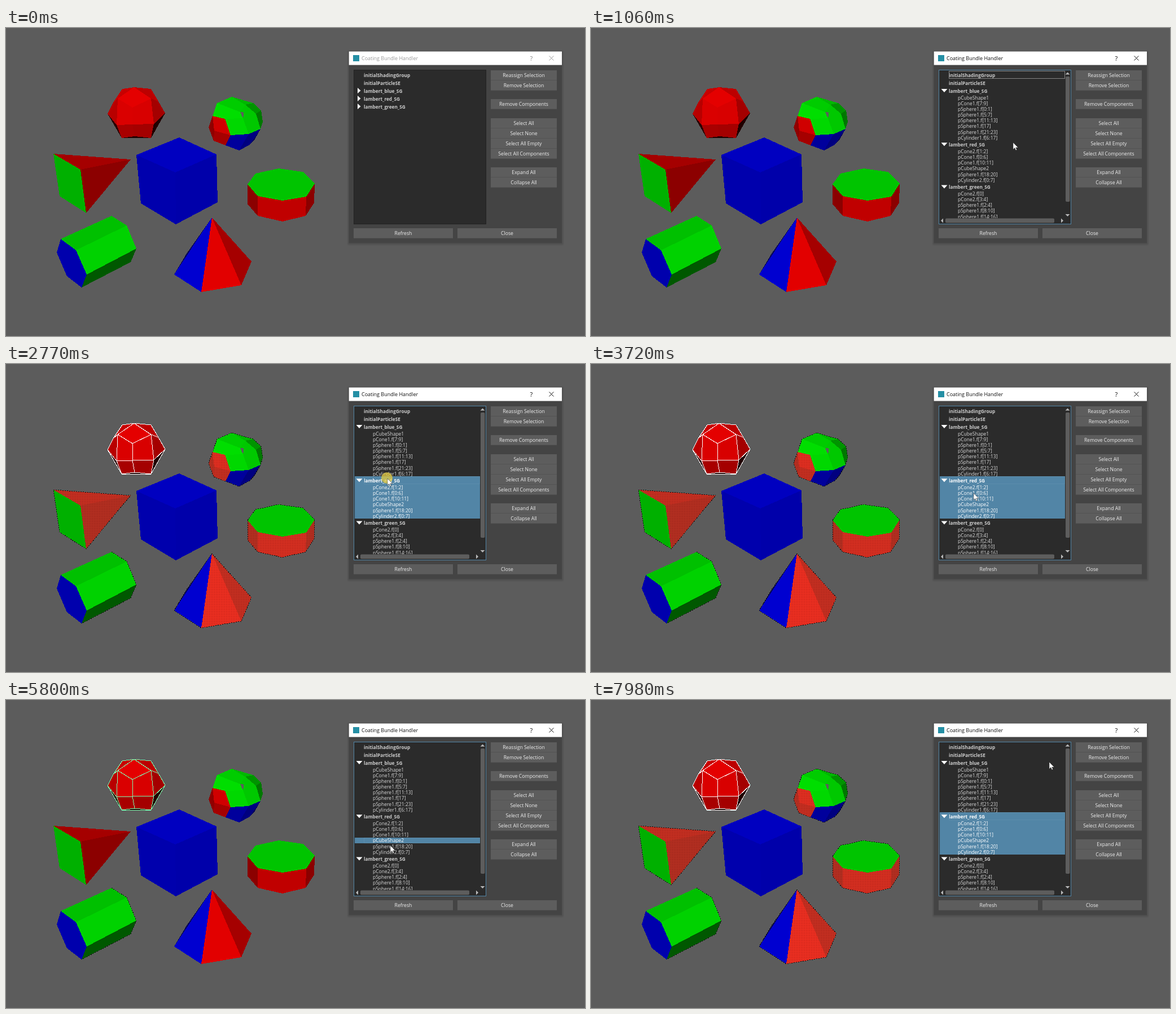
These frames come from a looping animation (1026x546 px, 8000 ms). An HTML page:

```html
<!DOCTYPE html>
<html lang="en">
<head>
<meta charset="utf-8">
<title>Coating Bundle Handler</title>
<style>
html, body { margin: 0; width: 100%; height: 100%; overflow: hidden; background: #5c5c5c; }
svg { display: block; width: 1026px; height: 546px; }
text { font-family: "Open Sans", "Noto Sans", sans-serif; font-size: 8.5px; fill: #d8d8d8; }
.head { font-size: 8.25px; font-weight: 700; fill: #ccc; }
.button { font-size: 8.7px; fill: #eee; text-anchor: middle; }
.crisp { shape-rendering: crispEdges; }
</style>
</head>
<body>
<svg id="stage" viewBox="0 0 1026 546"></svg>
<script>
const LOOP = 8000;
const stage = document.getElementById('stage');

function make(tag, attrs = {}, parent = stage, content = '') {
  const node = document.createElementNS('http://www.w3.org/2000/svg', tag);
  for (const key in attrs) node.setAttribute(key, attrs[key]);
  if (content) node.textContent = content;
  parent.appendChild(node);
  return node;
}
const rect = (x, y, width, height, fill, parent, more = {}) =>
  make('rect', { x, y, width, height, fill, ...more }, parent);
const path = (d, fill, parent, more = {}) => make('path', { d, fill, ...more }, parent);
const show = (node, on) => node.setAttribute('display', on ? 'inline' : 'none');

const defs = make('defs');
const stipple = make('pattern', { id: 'stipple', width: 3, height: 3, patternUnits: 'userSpaceOnUse' }, defs);
rect(0, 0, 3, 3, '#ff8a60', stipple, { opacity: .34 });
rect(0, 0, 1, 1, '#400', stipple, { opacity: .4 });
rect(0, 0, 1026, 546, '#5c5c5c');

// Each solid: named corner points, then faces as corner letters with a colour.
const solids = {
  cube: {
    points: 'a231,225 b307,194 c373,224 d300,256 e239,311 f301,348 g375,309',
    faces: 'abcd:0000c0 adfe:0000ad dcgf:0000aa'
  },
  wedge: {
    points: 'a84,223 b221,233 c132,251 d95,298 e142,328',
    faces: 'abc:a50000 cbe:8c0000 aced:00b000', rim: 'abeda'
  },
  tube: {
    points: 'a97,374 b124,394 c143,437 d134,460 e108,440 f90,398 g187,333 h214,350 i231,391 j221,415',
    faces: 'abcdef:0000ad aghb:00c000 bhic:00d200 cijd:005800', rim: 'ghijd'
  },
  cone: {
    points: 'a365,336 b298,437 c346,468 d417,456 e435,414 f320,400',
    faces: 'afb:00005a abc:0000d0 acd:e20000 ade:a50000', rim: 'afbcdea'
  },
  drum: {
    points: 'a428,277 b442,258 c483,249 d526,255 e547,276 f532,299 g490,306 h446,298 i428,312 j446,333 k490,343 l531,333 m546,310',
    faces: 'abcdefgh:00c400 ahji:8b0000 hgkj:c00000 gflk:c00000 feml:8b0000', rim: 'aijklmedcba'
  },
  ball: {
    points: 'a206,108 b227,105 c257,108 d282,151 e257,195 f205,195 g180,152 h190,132 i270,130 k198,125 l257,125 m224,141 n196,172 o224,171 p262,170 q228,192',
    faces: 'bahk:c80000 bcil:bc0000 bkml:e40000 hgnk:b80000 lpdi:a40000 knom:da0000 mopl:d80000 noqf:a80000 opeq:a40000 gnf:280000 dpe:200000 fqe:200000'
  },
  sphere: {
    points: 'a400,122 b374,133 c366,156 d388,161 e398,190 f389,208 g368,200 h359,176 i369,182 j430,188 k451,179 l455,166 m452,146 n438,133 o424,136 p415,149 q420,160 r443,152 s441,197 t432,207 u413,217',
    faces: 'cdei:d00000 cigh:900000 iefg:a50000 baop:00cc00 cbpqd:00de00 dqje:00d800 oprkjq:00c800 por:00c800 ano:00b800 onmr:009400 rmlk:007800 ejuf:00009c jkstu:000080 kst:000058',
    rim: 'abchgfutsklmna'
  }
};

for (const solid of Object.values(solids)) {
  const at = {};
  for (const p of solid.points.split(' ')) at[p[0]] = p.slice(1);
  const line = letters => 'M' + [...letters].map(c => at[c]).join('L');
  const group = make('g', { class: 'crisp' });
  const faces = solid.faces.split(' ').map(f => f.split(':'));
  const outline = faces.map(([letters]) => line(letters) + 'Z').join('');
  for (const [letters, color] of faces) path(line(letters) + 'Z', '#' + color, group);

  const hueLayer = test => {
    const d = faces.filter(([, c]) => test(c)).map(([letters]) => line(letters) + 'Z').join('');
    return path(d, 'url(#stipple)', group);
  };
  solid.red = hueLayer(c => c.endsWith('0000'));
  solid.blue = hueLayer(c => c.startsWith('0000'));
  if (solid.rim) solid.dots = path(line(solid.rim), 'none', group, { stroke: '#111', 'stroke-dasharray': '2 2' });
  solid.wire = path(outline, 'none', group, { 'stroke-width': 1, 'stroke-linejoin': 'bevel' });
}

// Dialog
for (let i = 4; i > 0; i--)
  rect(608 - i, 43 - i, 377 + 2 * i, 339 + 2 * i, '#000', stage, { opacity: .03, rx: i });
rect(607.7, 41.6, 377.3, 339.6, '#444');
rect(607.7, 41.6, 377.3, 24, '#fff');
rect(615, 48, 11, 11, '#258fa5');
const title = make('text', { x: 630, y: 57, style: 'font-size:9px' }, stage, 'Coating Bundle Handler');
const help = make('text', { x: 928.5, y: 57.5, style: 'font-size:11px' }, stage, '?');
const cross = path('M962.5 49.5l8 8m0-8l-8 8', 'none', stage, { 'stroke-width': 1 });

function button(label, x, y, width) {
  const face = rect(x, y, width, 18, '#5d5d5d');
  rect(x, y + 17.5, width, .7, '#4b4b4b');
  make('text', { class: 'button', x: x + width / 2, y: y + 12 }, stage, label);
  return face;
}
const column = {
  'Reassign Selection': 75, 'Remove Selection': 93, 'Remove Components': 126,
  'Select All': 160, 'Select None': 178, 'Select All Empty': 196, 'Select All Components': 214,
  'Expand All': 247, 'Collapse All': 265
};
const buttons = {};
for (const label in column) buttons[label] = button(label, 859, column[label], 117);
button('Refresh', 616, 355, 176);
button('Close', 800, 355, 176);

const list = rect(616.5, 74.5, 234, 273, '#2b2b2b', stage, { class: 'crisp' });

// Tree
const HEAD = 14, LEAF = 10.17, TOP = 76;
const groups = [
  ['initialShadingGroup'], ['initialParticleSE'],
  ['lambert_blue_SG', 'pCubeShape1', 'pCone1.f[7:9]', 'pSphere1.f[0:1]', 'pSphere1.f[5:7]',
    'pSphere1.f[11:13]', 'pSphere1.f[17]', 'pSphere1.f[21:23]', 'pCylinder1.f[6:17]'],
  ['lambert_red_SG', 'pCone2.f[1:2]', 'pCone1.f[0:6]', 'pCone1.f[10:11]', 'pCubeShape2',
    'pSphere1.f[18:20]', 'pCylinder2.f[0:7]'],
  ['lambert_green_SG', 'pCone2.f[0]', 'pCone2.f[3:4]', 'pSphere1.f[2:4]', 'pSphere1.f[8:10]', 'pSphere1.f[14:16]']
];
make('rect', { x: 618, y: 76, width: 222, height: 261 }, make('clipPath', { id: 'view' }, defs));
const tree = make('g', { 'clip-path': 'url(#view)' });
const closed = make('g', {}, tree), open = make('g', {}, tree);
const rows = {};
let y = TOP;
groups.forEach((names, g) => {
  const flatY = TOP + g * HEAD;
  make('text', { class: 'head', x: 634, y: flatY + 10.6 }, closed, names[0]);
  if (names.length > 1) path(`M623 ${flatY + 2}v10l5.5 -5z`, '#fff', closed);
  names.forEach((name, i) => {
    const height = i ? LEAF : HEAD;
    const top = Math.round(y), bottom = Math.round(y + height);
    const bar = rect(618, top, 222, bottom - top, '#5285a6', open, { class: 'crisp' });
    const label = make('text', {
      class: i ? 'leaf' : 'head', x: i ? 650 : 634, y: y + height / 2 + 3.5
    }, open, name);
    if (!i && names.length > 1) path(`M620.5 ${y + 4}h11l-5.5 6z`, '#fff', open);
    rows[name] = { bar, label, group: names[0], top, bottom };
    y += height;
  });
});
const focus = rect(634.5, 0, 205, 0, 'none', open);

// Scroll bars
const bars = make('g');
rect(840, 76, 10, 270, '#2b2b2b', bars);
rect(618, 337, 232, 9.5, '#2b2b2b', bars);
rect(841, 86, 7.5, 222, '#5d5d5d', bars, { rx: 2 });
rect(628, 337.5, 193, 8, '#5d5d5d', bars, { rx: 2 });
path('M840.5 82.5h8l-4-4zM840.5 330h8l-4 4zM624 337.5v8l-4-4zM833 337.5v8l4-4z', '#b8b8b8', bars);

// Pointer
const halo = make('circle', { r: 10, fill: '#e6cc3c', opacity: .72 });
const pointer = path('M0 0V12.2L2.9 9.5L4.7 13.8L6.6 13L4.8 8.9H8.8Z', '#fff', stage,
  { stroke: '#222', 'stroke-width': .5 });

const track = [
  [70, 990, 496], [470, 908, 256], [870, 908, 256], [940, 890, 248], [1060, 748, 203], [1470, 678, 110],
  [1960, 678, 110], [2440, 676, 203], [2970, 676, 203], [3180, 677, 219], [3380, 677, 219], [3720, 678, 229],
  [4130, 678, 229], [4320, 679, 239], [5130, 679, 239], [5340, 681, 248], [5600, 681, 248], [5800, 681, 258],
  [6750, 681, 258], [6890, 687, 238], [7100, 671, 204], [7500, 671, 204], [7980, 812, 110]
];
const clicks = [[800, 930], [1750, 1890], [2770, 2900], [3920, 4130], [4800, 4930], [5400, 5600], [6200, 6400], [7300, 7430]];
const selections = [
  [0, ''], [1680, 'lambert_blue_SG'], [2770, 'lambert_red_SG'], [4070, 'pCone1.f[0:6]'],
  [4800, 'pCone1.f[10:11]'], [5400, 'pCubeShape2'], [6200, 'pSphere1.f[18:20]'], [7300, 'lambert_red_SG']
];
const latest = (keys, t) => keys.reduce((found, key) => key[0] <= t ? key : found)[1];

function pointerAt(t) {
  const next = track.findIndex(key => key[0] > t);
  if (next < 0) return track[track.length - 1].slice(1);
  const [t0, x0, y0] = track[next - 1], [t1, x1, y1] = track[next];
  const steps = Math.max(1, Math.round((t1 - t0) / 67));
  const u = Math.floor((t - t0) / (t1 - t0) * steps) / steps;
  const e = u * u * (3 - 2 * u);
  return [x0 + (x1 - x0) * e, y0 + (y1 - y0) * e];
}

function drawSolids(picked) {
  const red = picked === 'lambert_red_SG', blue = picked === 'lambert_blue_SG';
  const opened = { cone: picked.startsWith('pCone1'), sphere: picked.startsWith('pSphere1') };
  for (const [name, solid] of Object.entries(solids)) {
    const whole = name === 'cube' || name === 'ball';
    const redOn = red || (name === 'cone' && picked === 'pCone1.f[10:11]') || (name === 'sphere' && opened.sphere);
    show(solid.red, !whole && redOn);
    show(solid.blue, !whole && blue);
    if (solid.dots)
      show(solid.dots, name === 'tube' ? picked : opened[name] || red || (blue && name in opened));
    const lead = name === 'ball' && picked === 'pCubeShape2';
    show(solid.wire, lead || (name === 'ball' && red) || (name === 'cube' && blue));
    solid.wire.setAttribute('stroke', lead ? '#7dffb4' : '#fff');
  }
}

function render(t) {
  const active = t >= 800, expanded = t >= 930;
  title.style.fill = active ? '#111' : '#999';
  help.style.fill = active ? '#111' : '#888';
  cross.setAttribute('stroke', active ? '#111' : '#999');
  list.setAttribute('stroke', expanded ? '#5285a6' : '#222');
  show(closed, !expanded);
  show(open, expanded);
  show(bars, expanded);
  const pressed = t >= 800 && t < 930, hovered = t >= 400 && t < 1000;
  buttons['Expand All'].setAttribute('fill', pressed ? '#333' : hovered ? '#707070' : '#5d5d5d');

  const picked = latest(selections, t);
  for (const [name, row] of Object.entries(rows)) {
    const on = name === picked || row.group === picked;
    show(row.bar, on);
    row.label.style.fill = on ? '#fff' : '';
  }
  const current = rows[t >= 3920 && t < 4070 ? 'pCone1.f[0:6]' : picked || 'initialShadingGroup'];
  focus.setAttribute('y', current.top + .5);
  focus.setAttribute('height', current.bottom - current.top - 1);
  focus.setAttribute('stroke', picked ? '#5c8dac' : '#858585');

  drawSolids(t < 1750 ? '' : picked);

  show(pointer, t >= 70);
  show(halo, clicks.some(([from, to]) => t >= from && t < to));
  if (t < 70) return;
  const [px, py] = pointerAt(t);
  pointer.setAttribute('transform', `translate(${px} ${py})`);
  halo.setAttribute('cx', px - 1);
  halo.setAttribute('cy', py - 1);
}

const start = performance.now();
function tick(now) {
  render(Math.max(0, now - start) % LOOP);
  requestAnimationFrame(tick);
}
render(0);
requestAnimationFrame(tick);
</script>
</body>
</html>
```
